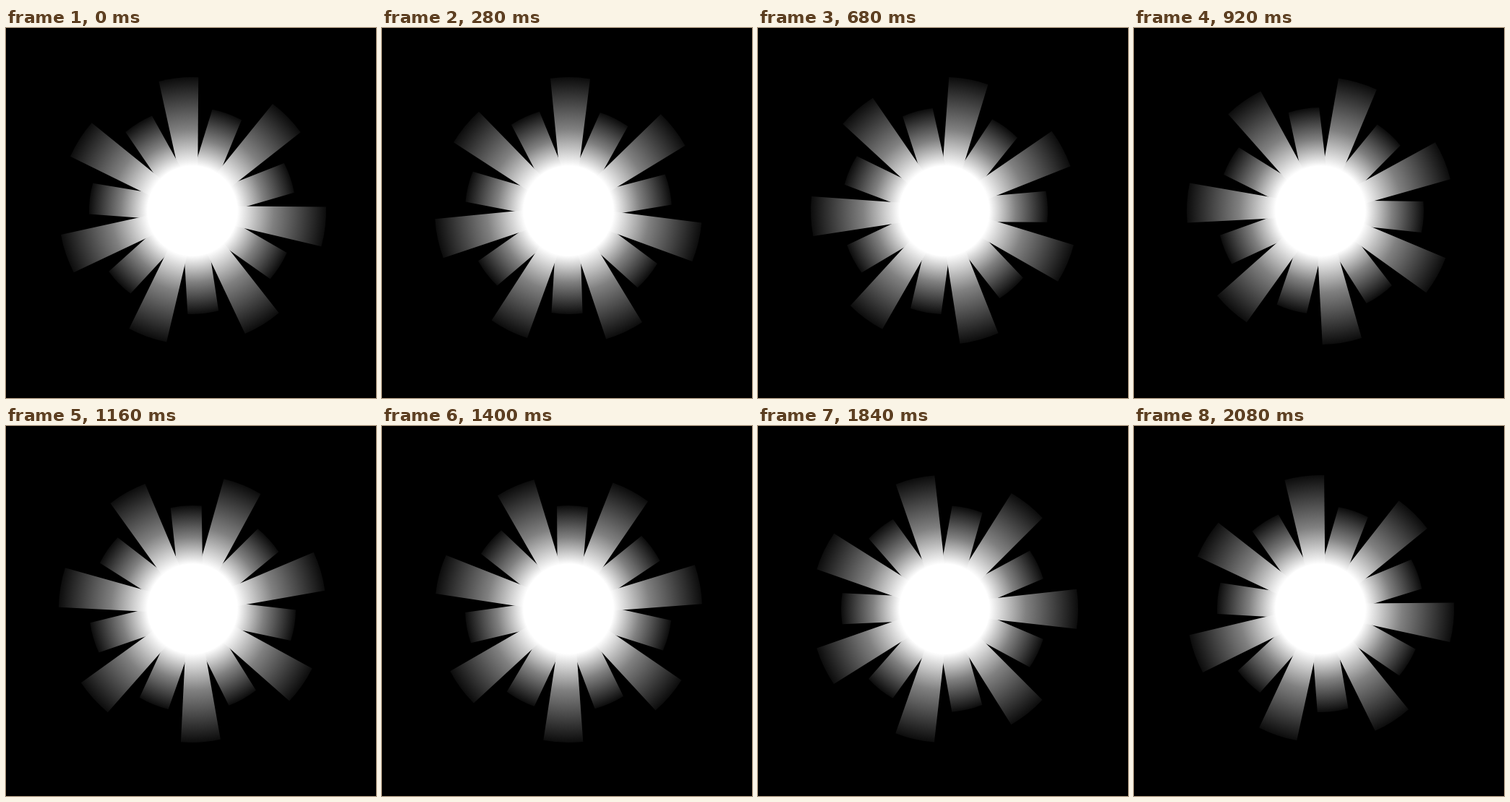
Animation of 512x512 px, one loop 2120 ms. Source, as an HTML page with a canvas:

```html
<!DOCTYPE html>
<html lang="en">
<head>
<meta charset="utf-8">
<title>Turning starburst</title>
<style>
  html, body { margin: 0; width: 100%; height: 100%; overflow: hidden; background: #000; }
  canvas { display: block; width: 512px; height: 512px; }
</style>
</head>
<body>
<canvas id="stage" width="512" height="512"></canvas>
<script>
const ctx = document.getElementById('stage').getContext('2d');
const LOOP = 2120, STEP = 40;
const RAYS = 7, SECTOR = 2 * Math.PI / RAYS;
const START = -6 * Math.PI / 180;
const CORE = 62;

// White up to the core, mid grey at `half`, nearly black at the rim.
function glow(half, radius) {
  const g = ctx.createRadialGradient(0, 0, CORE, 0, 0, radius);
  g.addColorStop(0, '#fff');
  g.addColorStop((half - CORE) / (radius - CORE), '#808080');
  g.addColorStop(1, '#0c0c0c');
  return g;
}

// Each ray widens from half-width `base` at the hub to `tip` at its rounded end.
const longRay = { radius: 185, base: 7, tip: 27.5, fill: glow(113, 185) };
const shortRay = { radius: 143, base: 15, tip: 21.5, fill: glow(99, 143) };

function drawRay({ radius, base, tip, fill }, angle) {
  const spread = Math.asin(tip / radius);
  ctx.save();
  ctx.rotate(angle);
  ctx.beginPath();
  ctx.moveTo(-base, 0);
  ctx.arc(0, 0, radius, -Math.PI / 2 - spread, -Math.PI / 2 + spread);
  ctx.lineTo(base, 0);
  ctx.fillStyle = fill;
  ctx.fill();
  ctx.restore();
}

function draw(time) {
  const t = Math.floor(time % LOOP / STEP) * STEP;
  const turn = START + SECTOR * t / LOOP;
  ctx.setTransform(1, 0, 0, 1, 0, 0);
  ctx.fillStyle = '#000';
  ctx.fillRect(0, 0, 512, 512);
  ctx.translate(258, 253);
  for (let i = 0; i < RAYS; i++) {
    drawRay(shortRay, turn + (i + 0.5) * SECTOR);
    drawRay(longRay, turn + i * SECTOR);
  }
  ctx.beginPath();
  ctx.arc(0, 0, CORE, 0, 2 * Math.PI);
  ctx.fillStyle = '#fff';
  ctx.fill();
}

const begin = performance.now();
function tick() {
  draw(performance.now() - begin);
  requestAnimationFrame(tick);
}
tick();
</script>
</body>
</html>
```
